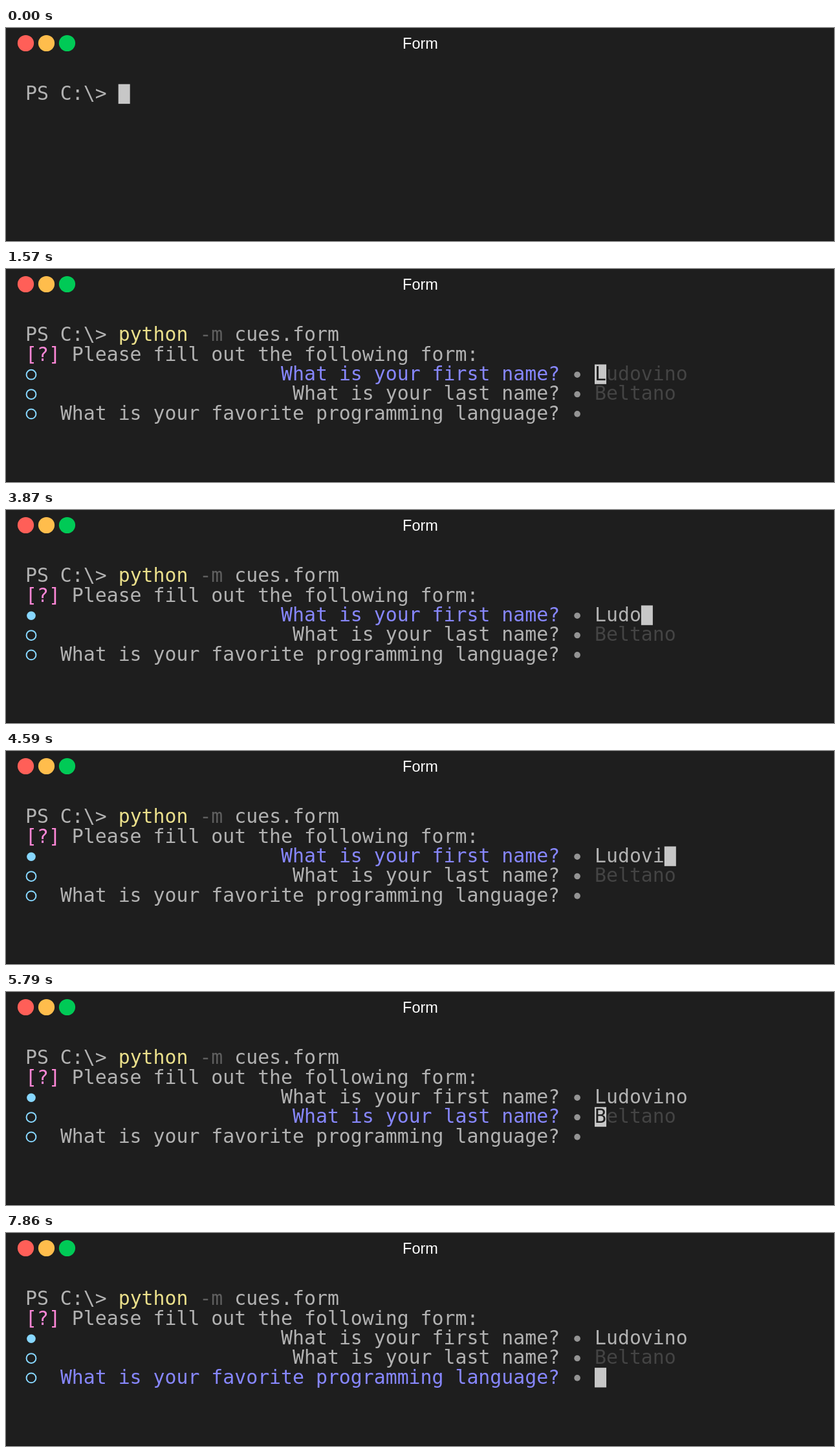
An HTML page that plays this animation: 1280x329 px, repeating every 8 s.

```html
<!DOCTYPE html>
<html lang="en">
<head>
<meta charset="utf-8">
<title>Form</title>
<style>
  html, body { margin: 0; width: 100%; height: 100%; overflow: hidden; background: #1e1e1e; }
  svg { display: block; width: 1280px; height: 329px; }
  #screen text { font: 29.83px "DejaVu Sans Mono", monospace; white-space: pre; }
  .title { font: 23.5px "Liberation Sans", Arial, sans-serif; fill: #fff; text-anchor: middle; }
</style>
</head>
<body>
<svg viewBox="0 0 1280 329">
  <rect width="1280" height="329" fill="#1e1e1e"/>
  <rect y="328" width="1280" height="1" fill="#141414"/>
  <circle cx="30.5" cy="23.5" r="12.6" fill="#ff5f58"/>
  <circle cx="62.5" cy="23.5" r="12.6" fill="#ffbd4c"/>
  <circle cx="94.5" cy="23.5" r="12.6" fill="#00ca56"/>
  <text class="title" x="640.5" y="32">Form</text>
  <g id="screen"></g>
</svg>
<script>
const LOOP = 8000;
const CELL = 17.96, LINE = 30.35, LEFT = 30, TOP = 86.7;
const BG = '#1e1e1e', TEXT = '#b2b2b2', DIM = '#444', CURSOR = '#c7c7c7';
const YELLOW = '#ebe08b', FLAG = '#5f5f5f', PINK = '#ff87d7', ACTIVE = '#8787ff', BLUE = '#87d7ff';

const FIELDS = [
  { question: 'What is your first name?', hint: 'Ludovino' },
  { question: 'What is your last name?', hint: 'Beltano' },
  { question: 'What is your favorite programming language?', hint: '' },
];
const KEYS = [3100, 3400, 3570, 3870, 4460, 4580, 4710, 4880];
const MOVES = [5790, 7860];
const QUESTION_END = 46, ANSWER = 49, FIRST_ROW = 2, LAST_ROW = 5;

const screen = document.getElementById('screen');
const colX = col => LEFT + col * CELL;
const rowY = row => TOP + row * LINE;
const passed = (times, t) => times.filter(time => t >= time).length;

const write = (row, col, text, fill = TEXT) =>
  `<text x="${colX(col)}" y="${rowY(row) + 24.6}" fill="${fill}">${text.replace('>', '&gt;')}</text>`;

const dot = (row, col, r, paint) =>
  `<circle cx="${colX(col + 0.5)}" cy="${rowY(row) + 15.8}" r="${r}" ${paint}/>`;

const cursor = (row, col, under = '') =>
  `<rect x="${colX(col)}" y="${rowY(row)}" width="18" height="30.4" fill="${CURSOR}"/>` +
  write(row, col, under, BG);

function form(t) {
  const typed = passed(KEYS, t), active = passed(MOVES, t);
  let out = write(1, 0, '[?]', PINK) + write(1, 4, 'Please fill out the following form:');

  FIELDS.forEach(({ question, hint }, i) => {
    const row = FIRST_ROW + i, filled = i === 0 && typed > 0;
    out += filled
      ? dot(row, 0, 6.8, `fill="${BLUE}"`)
      : dot(row, 0, 7.4, `fill="none" stroke="${BLUE}" stroke-width="2"`);
    out += write(row, QUESTION_END - question.length, question, i === active ? ACTIVE : TEXT);
    out += dot(row, 47, 4.8, 'fill="#949494"');
    out += write(row, ANSWER, filled ? hint.slice(0, typed) : hint, filled ? TEXT : DIM);
  });

  // The cursor drops below the form just before each update.
  const parked = KEYS.some(k => t >= k - 20 && t < k) || MOVES.some(m => t >= m - 100 && t < m);
  if (parked) return out + cursor(LAST_ROW, 0);
  if (t < 1570) return out;
  const offset = active === 0 ? typed : 0;
  const under = offset ? '' : FIELDS[active].hint.charAt(0);
  return out + cursor(FIRST_ROW + active, ANSWER + offset, under);
}

function view(t) {
  let out = write(0, 0, 'PS C:\\>');
  if (t < 500) return out + cursor(0, 8);
  out += write(0, 8, 'python', YELLOW) + write(0, 15, '-m', FLAG) + write(0, 18, 'cues.form');
  if (t < 520) return out;
  if (t < 1350) return out + cursor(0, 27);
  if (t < 1470) return out + cursor(1, 0);
  return out + form(t);
}

let shown = '';
function frame() {
  const next = view(performance.now() % LOOP);
  if (next !== shown) screen.innerHTML = shown = next;
  requestAnimationFrame(frame);
}
frame();
</script>
</body>
</html>
```
